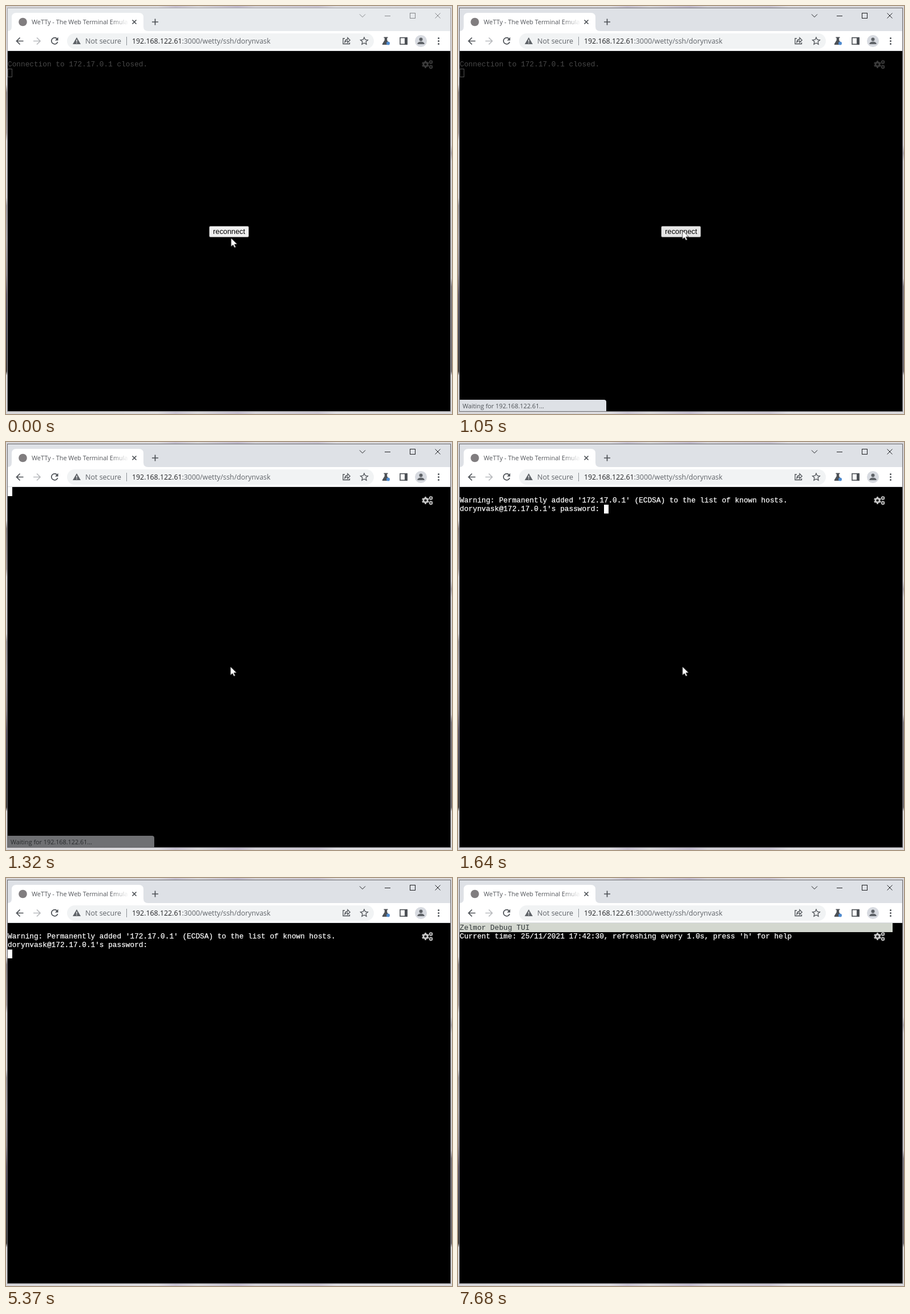
These frames come from a looping animation (782 px wide and 716 px high, 8000 ms). An HTML page:

```html
<!DOCTYPE html>
<html lang="en">
<head>
<meta charset="utf-8">
<title>Web terminal</title>
<style>
html, body { margin: 0; width: 100%; height: 100%; overflow: hidden; background: #d8d7da; }
svg { display: block; width: 782px; height: 716px; }
text { font-family: "Open Sans", "Noto Sans", sans-serif; white-space: pre; }
.term text { font: 12.776px "Liberation Mono", "Courier New", monospace; fill: #fff; }
.term .bright { stroke: #fff; stroke-width: .25; }
.line { fill: none; stroke: #4d5156; stroke-width: 1.7; }
.muted { fill: #5f6368; }

/* Every change is a hard cut within one 8 s loop: percent = ms / 80 */
.cut { animation: 8s step-end infinite; }
.frame { animation-name: frame; }
.strip { animation-name: strip; }
.controls { animation-name: controls; fill: none; }
.closed { animation-name: closed; }
.button { animation-name: button; stroke: #767676; }
.status { animation-name: status; }
.gears { animation-name: gears; }
.home { animation-name: home; }
.prompt { animation-name: prompt; }
.caret { animation-name: caret; }
.caret-next { animation-name: caret-next; }
.tui { animation-name: tui; }
.pointer { animation-name: pointer; }

@keyframes frame { 0% { stroke: #a3a3a6 } 4.125%, 100% { stroke: #69696d } }
@keyframes strip { 0% { fill: #e7eaed } 4.125%, 100% { fill: #dee1e6 } }
@keyframes controls { 0% { stroke: #85878a } 4.125%, 100% { stroke: #1f2023 } }
@keyframes closed { 0% { opacity: 1 } 14.375%, 100% { opacity: 0 } }
@keyframes button { 0% { fill: #f0f0f0 } 2.6875%, 100% { fill: #e5e5e5 } }
@keyframes status { 0% { opacity: 0 } 6.375% { opacity: 1 } 16.5% { opacity: .5 } 18%, 100% { opacity: 0 } }
@keyframes gears { 0% { color: #3c3c3c } 14.375% { color: #000 } 16.5%, 100% { color: #cacaca } }
@keyframes home { 0% { opacity: 0 } 14.375% { opacity: 1 } 20.5%, 100% { opacity: 0 } }
@keyframes prompt { 0% { opacity: 0 } 20.5% { opacity: 1 } 93.5%, 100% { opacity: 0 } }
@keyframes caret { 0% { opacity: 0 } 20.5% { opacity: 1 } 67.125%, 100% { opacity: 0 } }
@keyframes caret-next { 0% { opacity: 0 } 67.125% { opacity: 1 } 93.5%, 100% { opacity: 0 } }
@keyframes tui { 0% { opacity: 0 } 96%, 100% { opacity: 1 } }
@keyframes pointer {
  0% { transform: translate(394.5px, 407px); opacity: 1 }
  1.25% { transform: translate(394px, 401px); opacity: 1 }
  2.6875% { transform: translate(393.5px, 394px); opacity: 1 }
  23% { transform: translate(389px, 390px); opacity: 1 }
  24.25% { transform: translate(385px, 386px); opacity: 1 }
  25.375% { transform: translate(381px, 382px); opacity: 1 }
  26.625%, 100% { transform: translate(381px, 382px); opacity: 0 }
}
</style>
</head>
<body>
<svg viewBox="0 0 782 716">
  <defs>
    <linearGradient id="fade">
      <stop stop-color="#fff" stop-opacity="0"/>
      <stop offset="1" stop-color="#fff"/>
    </linearGradient>
    <linearGradient id="left" x2="0" y2="1">
      <stop offset=".19" stop-color="#dad9dd"/>
      <stop offset=".21" stop-color="#857e81"/>
      <stop offset=".31" stop-color="#a59c9e"/>
      <stop offset=".33" stop-color="#dad9dd"/>
      <stop offset=".47" stop-color="#d4d2d6"/>
      <stop offset=".49" stop-color="#99949a"/>
      <stop offset=".57" stop-color="#a8a3a8"/>
      <stop offset=".66" stop-color="#8d858c"/>
      <stop offset=".71" stop-color="#5b5160"/>
      <stop offset=".8" stop-color="#41414f"/>
      <stop offset=".9" stop-color="#3b3635"/>
      <stop offset=".91" stop-color="#d8d7da"/>
    </linearGradient>
    <linearGradient id="right" x2="0" y2="1">
      <stop offset=".34" stop-color="#d6d4d8"/>
      <stop offset=".36" stop-color="#aaa6ae"/>
      <stop offset=".38" stop-color="#d6d4d8"/>
      <stop offset=".67" stop-color="#c8c5c9"/>
      <stop offset=".69" stop-color="#77727a"/>
      <stop offset=".9" stop-color="#69656b"/>
      <stop offset=".91" stop-color="#d8d7da"/>
    </linearGradient>
    <linearGradient id="edge">
      <stop stop-color="#d6d5d8"/>
      <stop offset=".34" stop-color="#dcdbdf"/>
      <stop offset=".38" stop-color="#c8c2d2"/>
      <stop offset=".43" stop-color="#d8d7da"/>
      <stop offset=".52" stop-color="#c2bbce"/>
      <stop offset=".56" stop-color="#d4d2d8"/>
      <stop offset=".7" stop-color="#cac5d2"/>
      <stop offset=".74" stop-color="#dddce0"/>
      <stop offset="1" stop-color="#d8d7da"/>
    </linearGradient>
    <g id="gear" fill="none" stroke="currentColor">
      <circle r="3.6" stroke-width="3"/>
      <circle r="5.6" stroke-width="1.8" pathLength="12" stroke-dasharray="1" stroke-dashoffset="-.5"/>
    </g>
  </defs>

  <!-- Desktop and window -->
  <rect width="782" height="716" fill="url(#edge)"/>
  <rect y="3" width="2" height="709" fill="url(#left)"/>
  <rect x="780" y="3" width="2" height="709" fill="url(#right)"/>
  <rect class="cut strip" x="2" y="3" width="778" height="42"/>
  <path d="M3 79V44Q10 44 10 36V20Q10 12 18 12H233Q241 12 241 20V36Q241 44 249 44H779V79Z" fill="#fff"/>
  <path d="M3 78.5H779" stroke="#dadce0"/>
  <rect x="3" y="79" width="776" height="632"/>
  <rect class="cut frame" x="2.5" y="3.5" width="777" height="708" fill="none"/>

  <!-- Tab -->
  <circle cx="29.5" cy="28" r="7.3" fill="#807d7f"/>
  <text x="45" y="32" font-size="10.9" fill="#505358">WeTTy - The Web Terminal Emula</text>
  <rect x="184" y="18" width="31" height="20" fill="url(#fade)"/>
  <path class="line" d="M221.5 24.5l7 7m0-7l-7 7M256 28h11m-5.5-5.5v11"/>
  <g class="cut controls">
    <path d="M620 14.5l5 5 5-5M664 17.5h10M752.5 12.5l9 9m0-9l-9 9"/>
    <rect x="708.5" y="12.5" width="9" height="9"/>
  </g>

  <!-- Toolbar -->
  <path class="line" d="M30.5 61.5H18.5m6-6l-6 6 6 6"/>
  <path class="line" d="M48 61.5h12m-6-6l6 6-6 6" style="stroke:#b9bbbe"/>
  <path class="line" d="M89.5 57.5a5.6 5.6 0 1 0 1.1 5.5"/>
  <path d="M91.5 54.8v5.7h-5.7z" fill="#4d5156"/>
  <rect x="107" y="48" width="538" height="27" rx="13.5" fill="#f1f3f4"/>
  <path class="muted" d="M124 55l7 12h-14z"/>
  <path d="M124 59v4m0 1v1.5" stroke="#f1f3f4" stroke-width="1.4"/>
  <text class="muted" x="139" y="66" font-size="12.5">Not secure</text>
  <path d="M211.5 54v15" stroke="#8d9196"/>
  <text class="muted" x="221" y="66" font-size="12.35"><tspan fill="#202124">192.168.122.61</tspan>:3000/wetty/ssh/dorynvask</text>
  <g class="line" style="stroke-width:1.3">
    <path d="M594 57h-3v9.5h11.5v-2.5M594 63.5q.5-5 5-5v-3l4.2 4.4-4.2 4.3v-3q-3 0-5 2.3z"/>
    <path d="M628 55l1.9 4.2 4.5.5-3.4 3 1 4.5-4-2.3-4 2.3 1-4.5-3.4-3 4.5-.5z"/>
    <rect x="691" y="55.6" width="12" height="11.5" style="stroke-width:1.6"/>
  </g>
  <path d="M699 55h5v13h-5z" fill="#4d5156"/>
  <path d="M662.5 54.5h7v1.5h-1.3v4l4 6.5q.5 1.5-1 1.5h-10.4q-1.5 0-1-1.5l4-6.5v-4h-1.3z" fill="#4d5156"/>
  <circle cx="670" cy="65.5" r="3" fill="#4f8bd0"/>
  <circle cx="727.5" cy="61.5" r="10.5" fill="#d7dae0"/>
  <circle class="muted" cx="727.5" cy="58.5" r="3"/>
  <path class="muted" d="M721.5 67v-1.5q1.5-3 6-3t6 3V67z"/>
  <path d="M758.5 56.5h0m0 5h0m0 5h0" stroke="#4d5156" stroke-width="3" stroke-linecap="round"/>

  <!-- Terminal -->
  <g class="term">
    <g class="cut closed">
      <text x="3" y="106" style="fill:#484848">Connection to 172.17.0.1 closed.</text>
      <rect x="3.5" y="110.5" width="7" height="14" fill="none" stroke="#505050"/>
    </g>
    <rect class="cut home" x="3" y="79" width="8" height="16" fill="#fff"/>
    <g class="cut prompt">
      <text class="bright" x="3" y="106">Warning: Permanently added '172.17.0.1' (ECDSA) to the list of known hosts.</text>
      <text class="bright" x="3" y="121">dorynvask@172.17.0.1's password:</text>
    </g>
    <rect class="cut caret" x="256" y="110" width="8" height="15.5" fill="#fff"/>
    <rect class="cut caret-next" x="3" y="125.5" width="8" height="15.5" fill="#fff"/>
    <g class="cut tui">
      <rect x="3" y="79" width="759" height="16" fill="#d3d7cf"/>
      <text x="3" y="91" style="fill:#2e3436">Zelmor Debug TUI</text>
      <text class="bright" x="3" y="106">Current time: 25/11/2021 17:42:30, refreshing every 1.0s, press 'h' for help</text>
    </g>
  </g>
  <g class="cut gears">
    <use href="#gear" x="735.5" y="102.5"/>
    <use href="#gear" transform="translate(745 98.3) scale(.56)"/>
    <use href="#gear" transform="translate(745 106.9) scale(.56)"/>
  </g>

  <g class="cut closed">
    <rect class="cut button" x="356.5" y="386.5" width="69" height="19" rx="2"/>
    <text x="363" y="400" style="font:12.8px 'Liberation Sans',Arial,sans-serif">reconnect</text>
  </g>

  <g class="cut status">
    <path d="M3 691H256q4 0 4 4V711H3z" fill="#dee1e6"/>
    <text x="8" y="705.5" font-size="10.8" fill="#4d5156">Waiting for 192.168.122.61...</text>
  </g>

  <path class="cut pointer" d="M0 0V15.5L3.6 12.2 6 17.3 8.5 16.2 6.2 11.1H11Z" fill="#fff" stroke="#000" stroke-width=".7"/>
</svg>
</body>
</html>
```
